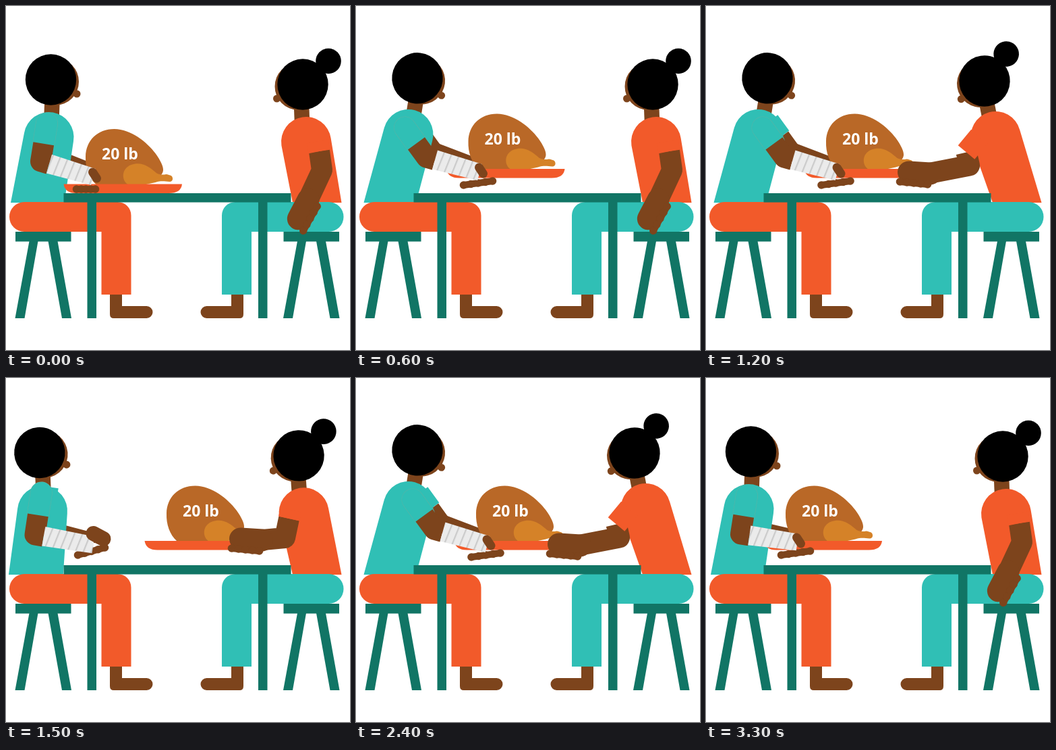
Write an HTML page that moves like this. It is 510x509 px and loops after 3600 ms.

```html
<!DOCTYPE html>
<html lang="en">
<head>
<meta charset="utf-8">
<title>Passing the turkey</title>
<style>
  html, body { margin: 0; width: 100%; height: 100%; overflow: hidden; background: #fff; }
  svg { display: block; width: 100%; height: 100%; }
  .teal { color: #30bfb5; }
  .seam { color: #58b4a6; }
  .orange { color: #f25a2a; }
  .skin { color: #7d441c; }
  .green { color: #117565; }
  .hair { color: #000; }
  path, circle, polygon, rect { fill: currentColor; }
  .wrap { fill: url(#wrap); }
  .limb { fill: none; stroke: currentColor; stroke-linejoin: round; }
  text { font: 700 23px "Open Sans", "Noto Sans", sans-serif; fill: #fff; }
</style>
</head>
<body>
<svg viewBox="0 0 510 509">
  <defs>
    <pattern id="wrap" width="11" height="40" patternUnits="userSpaceOnUse" patternTransform="rotate(22)">
      <rect width="11" height="40" style="fill:#ebebeb"/>
      <rect x="4" width="2.2" height="40" style="fill:#cbcbcb"/>
    </pattern>
    <g id="stool" class="green">
      <rect x="14.5" y="334" width="82.5" height="14.5"/>
      <path d="M35 348H48L28 462H14ZM63 348H77L97.500 462H83.500Z"/>
    </g>
    <path id="leg" d="M27.500 290H166A20 20 0 0 1 186 310V427H142V334H27.500A22 22 0 0 1 27.500 290Z"/>
    <path id="foot" class="skin" d="M154.500 427H172.500V444H209A9 9 0 0 1 209 462H160Q154.500 462 154.500 456Z"/>
  </defs>
  <g transform="translate(-.5)">
    <use href="#stool"/>
    <use href="#stool" x="397.5"/>
    <g id="back"></g>
    <g id="turkey">
      <path style="fill:#b96827" d="M134 264C123 254 118 239 118.500 223C119 199 136 182 161 182C186 182 210 202 222 218C230 229 234 238 233.500 243C233 252 220 260 200 264Z"/>
      <path style="fill:#d58228" d="M181 264C171 257 172 240 186 235C202 229 214 239 221 245C225 249 229 250 235 249.500C239 248 242 250 244 250.500C249 252 249 260 243 260C236 260 232 258 222 261L208 264Z"/>
      <path class="orange" d="M86 263.500H261.500Q260 277 242 277H105Q88 277 86 263.500Z"/>
      <text x="142.5" y="227">20 lb</text>
    </g>
    <use href="#foot"/>
    <use href="#foot" transform="matrix(-1 0 0 1 507 0)"/>
    <use href="#leg" class="orange"/>
    <use href="#leg" class="teal" transform="matrix(-1 0 0 1 506.500 0)"/>
    <g id="front"></g>
    <path class="green" d="M86 277H423V290.500H388V462H374.500V290.500H134.500V462H121V290.500H86Z"/>
  </g>
</svg>
<script>
const STEP = 300, STEPS = 12, LIFT = -22.5;
const byId = id => document.getElementById(id);
const mix = (a, b, t) => a.map((v, i) => v + (b[i] - v) * t);
const add = (a, b) => [a[0] + b[0], a[1] + b[1]];

const ball = (color, x, y, r) => `<circle class="${color}" cx="${x}" cy="${y}" r="${r}"/>`;
const group = (transform, art) => `<g transform="${transform}">${art}</g>`;
const limb = (color, width, points, cap = "butt") =>
  `<path class="limb ${color}" stroke-width="${width}" stroke-linecap="${cap}" d="M${points.join("L")}"/>`;

// A straight piece of arm that narrows from a to b.
function taper(color, a, b, widthA, widthB) {
  const angle = Math.atan2(b[1] - a[1], b[0] - a[0]);
  const side = (p, w) => [p[0] - Math.sin(angle) * w / 2, p[1] + Math.cos(angle) * w / 2];
  const corners = [side(a, widthA), side(b, widthB), side(b, -widthB), side(a, -widthA)];
  return `<polygon class="${color}" points="${corners.join(" ")}"/>`;
}

function fingers(from, to) {
  let art = limb("skin", 10, [from, to]);
  for (let i = 0; i < 5; i++) art += ball("skin", ...mix(from, to, i / 4), 5.8);
  return art;
}

// Side is the way the face looks; parts are placed around the centre of the hair.
function head([x, y], turn, side, bun = "") {
  const neck = limb("skin", 22.5, [[side * 2, 30], [side * 1, 56]]);
  return group(`translate(${x} ${y}) rotate(${turn})`,
    neck + ball("skin", side * 6.5, 3, 35) + ball("skin", side * 38.5, 21, 5.5) + ball("hair", 0, 0, 37.7) + bun);
}

// A round shoulder whose sides run down to the two hips.
function shirt(color, [x, y], angle, left, right) {
  const r = 37, dx = r * Math.cos(angle), dy = r * Math.sin(angle);
  return `<path class="${color}" d="M${left} 291L${x - dx} ${y - dy}A${r} ${r} 0 0 1 ${x + dx} ${y + dy}L${right} 291Z"/>`;
}

function drawMan({ lean, elbow, wrist, thumb, tips, shift = 0 }) {
  const shoulder = [64 + 14 * lean, 194 - 4 * lean];
  const root = add(shoulder, [-3 - 2 * lean, -20 + 10 * lean]);
  const cuff = mix(root, elbow, .53);
  const reach = Math.hypot(wrist[0] - elbow[0], wrist[1] - elbow[1]);
  const wrapStart = mix(elbow, wrist, 13 / reach);
  const move = `translate(${shift})`;
  const farArm = limb("skin", 30, [cuff, elbow]) + taper("skin", elbow, wrist, 28, 13)
    + limb("teal", 33, [root, cuff]);
  const nearArm = limb("seam", 33, [root, cuff], "round") + limb("teal", 31.8, [root, cuff], "round")
    + limb("skin", 31, [cuff, elbow, wrapStart])
    + group(`translate(${wrist})`, fingers(...tips))
    + taper("wrap", wrapStart, wrist, 29, 25)
    + group(`translate(${wrist})`, limb("skin", thumb.width, [thumb.from, thumb.to], "round"));
  return {
    back: group(move, group("translate(9 -9)", farArm))
      + head([67 + 24.5 * lean, 109 - 2.2 * lean], 7 * lean, 1)
      + shirt("teal", shoulder, .17 + .1 * lean, 7.5 + 4.5 * lean, 87 + 2.5 * lean),
    front: group(move, nearArm)
  };
}

function drawWoman({ lean, root, cuff, elbow, wrist, turn = 0 }) {
  const hand = limb("skin", 33, [[4, 0], [-28, -2]], "round") + fingers([-41, 12], [0, 16]);
  return {
    back: head([440.5 - 27 * lean, 116 - 5 * lean], -9 * lean, -1, ball("hair", 38, -34.5, 18.8))
      + shirt("orange", [445.5 - 15.5 * lean, 201 - 8 * lean], -.15 - .12 * lean, 425.5, 498),
    front: limb("skin", 31, [cuff, elbow, wrist]) + limb("orange", 32, [root, cuff])
      + group(`translate(${wrist}) rotate(${turn})`, hand)
  };
}

const grip = { thumb: { width: 13, from: [-1, -7], to: [5, 2] }, tips: [[-24, 19], [19, 13]] };
const open = { thumb: { width: 22, from: [0, -17], to: [15, -9] }, tips: [[-23, 15], [17, 4]] };

const holdLow = { ...grip, lean: 0, elbow: [52, 230], wrist: [130, 253], tips: [[-25, 18], [3, 18]] };
const holdHigh = { ...grip, lean: 0, elbow: [52, 231], wrist: [136, 243] };
const reach = { ...grip, lean: 1, elbow: [105, 224], wrist: [184, 246] };
const reachFar = { ...reach, shift: 11.5 };
const letGo = { ...open, lean: -.68, elbow: [43.5, 232], wrist: [130, 247] };

const idle = { lean: 0, root: [462, 200], cuff: [465, 215], elbow: [469, 243], wrist: [447, 290], turn: -66 };
const grab = { lean: 1, root: [406, 193], cuff: [386.5, 216.5], elbow: [391, 236], wrist: [329, 248] };
const keep = { lean: .22, root: [423, 195], cuff: [420, 208], elbow: [414, 236.5], wrist: [376, 240] };
const putDown = { ...keep, elbow: [414, 245], wrist: [376, 260] };

// [man, woman, turkey x, turkey y]; played forward, then backward.
const poses = [
  [holdLow, idle, 0, 0],
  [holdHigh, idle, 0, LIFT],
  [reach, idle, 48.5, LIFT],
  [reachFar, idle, 60, LIFT],
  [reachFar, grab, 60, LIFT],
  [letGo, keep, 120, LIFT],
  [letGo, putDown, 120, 0]
];

function draw(step) {
  const [manPose, womanPose, x, y] = poses[Math.min(step, STEPS - step)];
  const man = drawMan(manPose), woman = drawWoman(womanPose);
  byId("turkey").setAttribute("transform", `translate(${x} ${y})`);
  byId("back").innerHTML = man.back + woman.back;
  byId("front").innerHTML = man.front + woman.front;
}

let shown = -1;
function tick() {
  const step = Math.floor(performance.now() / STEP) % STEPS;
  if (step !== shown) draw(shown = step);
  requestAnimationFrame(tick);
}
tick();
</script>
</body>
</html>
```
